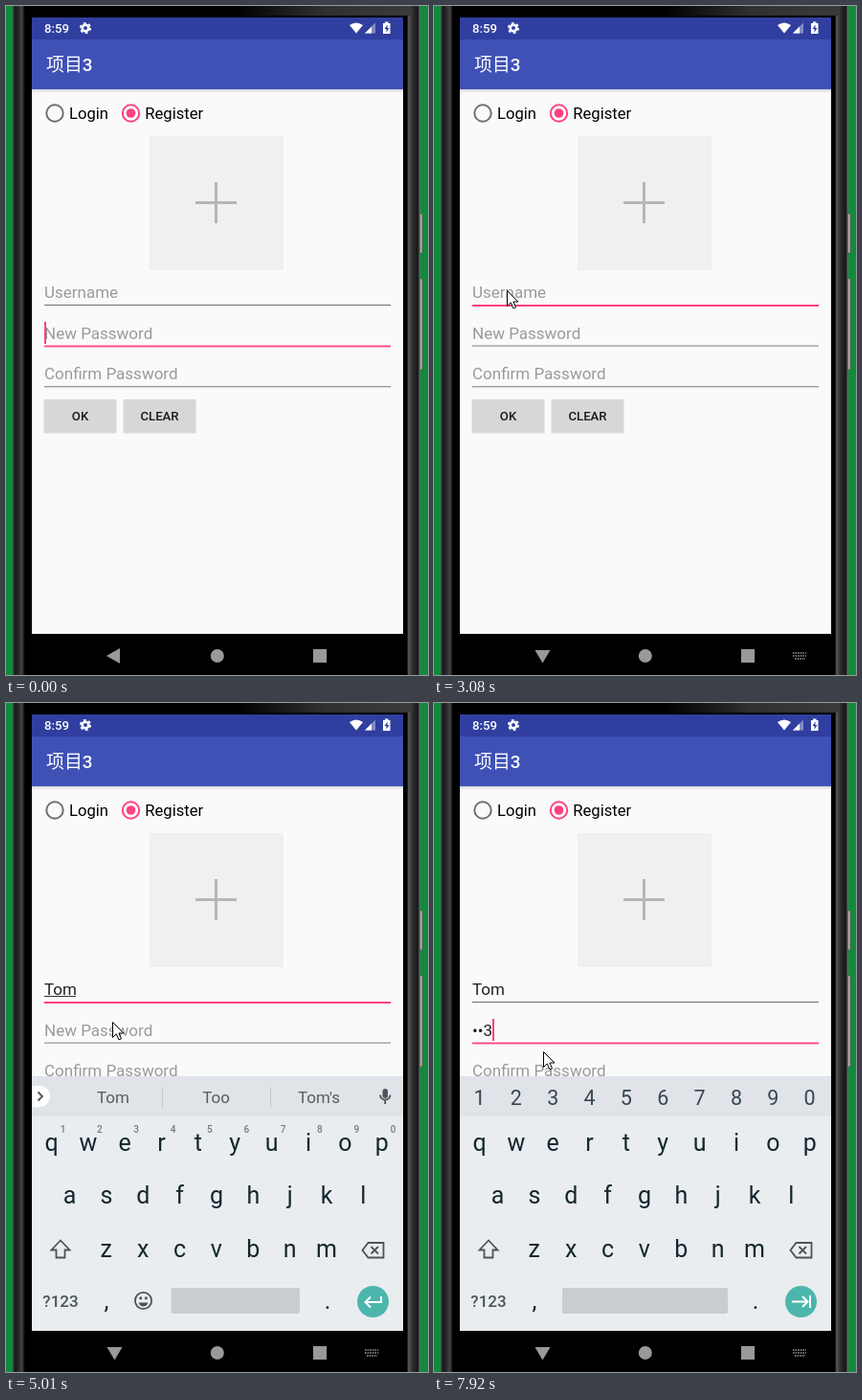
An HTML page that plays this animation: 441x699 px, repeating every 8000 ms.

```html
<!DOCTYPE html>
<html lang="en">
<head>
<meta charset="utf-8">
<title>Register form</title>
<style>
  html, body { margin: 0; width: 100%; height: 100%; overflow: hidden; background: #128a3d; }
  svg { display: block; width: 441px; height: 699px; font: 17px Roboto, "Noto Sans CJK SC", "Noto Sans CJK", sans-serif; }
  .mid { text-anchor: middle; }
  .bold { font-weight: 500; }
  .hint { fill: #9a9a9a; }
  .key { font-size: 25px; fill: #14272e; }
  .digit { font-size: 21.5px; fill: #37474f; }
  .corner { font-size: 10px; font-weight: 500; fill: #747b80; }
  .icon { fill: none; stroke: #4a555b; stroke-width: 1.8; }
</style>
</head>
<body>
<svg viewBox="0 0 441 699">
  <defs>
    <linearGradient id="leftEdge">
      <stop offset="0" stop-color="#4a4a4a"/><stop offset=".12" stop-color="#1a1a1a"/>
      <stop offset=".25" stop-color="#222"/><stop offset=".48" stop-color="#444"/>
      <stop offset=".6" stop-color="#111"/><stop offset=".66" stop-color="#000"/>
    </linearGradient>
    <linearGradient id="rightEdge">
      <stop offset="0" stop-color="#000"/><stop offset=".22" stop-color="#000"/>
      <stop offset=".32" stop-color="#5a5a5a"/><stop offset=".5" stop-color="#333"/>
      <stop offset=".85" stop-color="#161616"/><stop offset="1" stop-color="#777"/>
    </linearGradient>
    <linearGradient id="topEdge">
      <stop offset="0" stop-color="#000"/><stop offset=".5" stop-color="#303030"/>
      <stop offset="1" stop-color="#3a3a3a"/>
    </linearGradient>
    <linearGradient id="barShadow" x2="0" y2="1">
      <stop offset="0" stop-color="#d3d4dd"/><stop offset="1" stop-color="#fafafa"/>
    </linearGradient>
    <clipPath id="screen"><path d="M27 12h388v687H27z"/></clipPath>
  </defs>

  <!-- phone -->
  <path fill="#128a3d" d="M0 0h441v699H0z"/>
  <path fill="#000" d="M8 0h425v699H8z"/>
  <path fill="url(#leftEdge)" d="M7 0h20v699H7z"/>
  <path fill="url(#rightEdge)" d="M415 0h18v699h-18z"/>
  <path fill="url(#topEdge)" d="M240 0h184v10H240z"/>
  <path fill="#bba7b0" stroke="#5f4d55" stroke-width=".6" d="M432.500 217h2.500v41h-2.500zM432.500 285h2.500v95h-2.500z"/>

  <!-- app bars -->
  <path fill="#fafafa" d="M27 12h388v644H27z"/>
  <path fill="#303f9f" d="M27 12h388v23H27z"/>
  <path fill="#3f51b5" d="M27 35h388v52H27z"/>
  <path fill="url(#barShadow)" d="M27 87h388v4H27z"/>
  <g fill="#fff">
    <text class="bold" x="40" y="28" font-size="13.2">8:59</text>
    <text x="42" y="68" font-size="18.9">项目<tspan class="bold">3</tspan></text>
    <circle cx="83" cy="23" r="3.300" fill="none" stroke="#fff" stroke-width="2.600"/>
    <circle cx="83" cy="23" r="5.200" fill="none" stroke="#fff" stroke-width="1.800" stroke-dasharray="2.72"/>
    <path d="M359 20q7-5 14 0l-7 8.500z"/>
    <path opacity=".4" d="M375 28.500l11-11v11z"/><path d="M375 28.500l7-7v7z"/>
    <path d="M394 18h2v-1.500h3.500V18h2v11H394z"/>
    <path fill="#303f9f" d="M398.500 19.500l-3 4.500h2v3.500l3-4.500h-2z"/>
  </g>

  <!-- form -->
  <g fill="none" stroke-width="2">
    <circle cx="51" cy="112" r="8.700" stroke="#707070"/>
    <circle cx="130.500" cy="112" r="8.700" stroke="#ff4081"/>
  </g>
  <circle cx="130.500" cy="112" r="4.800" fill="#ff4081"/>
  <g font-size="16.6"><text x="66" y="118">Login</text><text x="145.300" y="118">Register</text></g>
  <path fill="#f0f0f0" d="M150 136h140v140H150z"/>
  <path fill="none" stroke="#b6b6b6" stroke-width="3" d="M198 205.500h43M219.500 184v43"/>
  <text class="hint" id="userHint" x="40" y="305">Username</text>
  <text class="hint" id="passHint" x="40" y="348">New Password</text>
  <text class="hint" x="40" y="390">Confirm Password</text>
  <text id="user" x="40" y="305" fill="#212121"></text>
  <text id="pass" x="40" y="348" fill="#212121"></text>
  <rect id="composing" x="40" y="306" height="1" fill="#333"/>
  <rect id="userLine" x="40" width="362"/>
  <rect id="passLine" x="40" width="362"/>
  <rect x="40" y="397.300" width="362" height="1" fill="#777"/>
  <rect id="caret" width="2" height="23" fill="#ff4081"/>
  <path fill="#000" opacity=".13" d="M39.500 412h76v34.500h-76zM122.500 412h76v34.500h-76z"/>
  <path fill="#d6d7d7" d="M40 411h75v34H40zM123 411h75v34h-75z"/>
  <g class="mid bold" font-size="13.2" fill="#1c1c1c">
    <text x="77.500" y="433">OK</text><text x="160.500" y="433">CLEAR</text>
  </g>

  <!-- keyboard -->
  <g clip-path="url(#screen)"><g id="keyboard" class="mid">
    <path fill="#000" d="M27 656h388v43H27z"/>
    <path fill="#e9edf0" d="M27 390h388v266H27z"/>
    <path fill="#e0e4e8" d="M27 390h388v42H27z"/>
    <g id="letters"></g>
    <g id="textMode">
      <path fill="#fff" d="M27 400h8a11 11 0 0 1 0 22h-8z"/>
      <path class="icon" stroke-width="2" d="M33.500 406.500l4.500 4.500-4.500 4.500"/>
      <path stroke="#c6cacd" d="M163.500 401v22M276.500 401v22"/>
      <g id="suggestions" fill="#555d62"></g>
      <rect x="393.500" y="403" width="5.500" height="10" rx="2.750" fill="#4a555b"/>
      <path class="icon" stroke-width="1.500" d="M391 409.500a5.200 5.200 0 0 0 10.500 0M396.200 415v4"/>
      <g id="corners"></g>
      <circle class="icon" cx="143.500" cy="624.500" r="8.600"/>
      <path fill="#4a555b" d="M138.500 626.500h10q-1.500 4-5 4t-5-4zM139.500 620.500h2.600v2.800h-2.600zM145 620.500h2.600v2.800H145z"/>
    </g>
    <g id="digits"></g>
    <path class="icon" d="M57 561.500l-9.500 10h5v8h9v-8h5z"/>
    <path class="icon" d="M378.500 564h16v15.500h-16l-6-7.700zM381.500 568l7.500 7.500M389 568l-7.500 7.500"/>
    <text class="bold" x="57" y="631" fill="#4a555b" font-size="17">?123</text>
    <text class="key" x="105" y="633" font-size="22">,</text>
    <text class="key" x="336" y="633" font-size="22">.</text>
    <rect id="space" y="611" height="27" rx="2" fill="#c9cdd0"/>
    <circle cx="383.500" cy="625.500" r="16.500" fill="#4db6ac"/>
    <path id="enter" fill="none" stroke="#fff" stroke-width="2"/>
  </g></g>

  <!-- navigation bar -->
  <g fill="#999">
    <path id="back"/>
    <circle cx="220.800" cy="679" r="7"/>
    <path d="M321 672h14v14h-14z"/>
    <path id="imeSwitch" fill="none" stroke="#999" stroke-width="1.600" stroke-dasharray="1.6 1"
      d="M375 676h14M375 679h14M377 682h11"/>
  </g>

  <path id="pointer" fill="#fff" stroke="#000" d="M.5.5v16l3.800-3.600 2.600 6 2.600-1.100-2.600-5.800h5z"/>
</svg>

<script>
const LOOP = 8000;
const PINK = "#ff4081";
const el = Object.fromEntries([...document.querySelectorAll("[id]")].map(node => [node.id, node]));
const show = (node, on) => node.setAttribute("visibility", on ? "visible" : "hidden");
const set = (node, attrs) => { for (const name in attrs) node.setAttribute(name, attrs[name]); };
const label = (text, x, y, cls = "") => `<text class="${cls}" x="${x}" y="${y}">${text}</text>`;
const row = (chars, x, y, cls) => [...chars].map((c, i) => label(c, x + i * 38.35, y, cls)).join("");

el.letters.innerHTML = row("qwertyuiop", 47.5, 468, "key") + row("asdfghjkl", 66.6, 523, "key") + row("zxcvbnm", 104.8, 579, "key");
el.corners.innerHTML = row("1234567890", 59.5, 449, "corner");
el.digits.innerHTML = row("1234567890", 47.5, 420, "digit");

// Each step is [start time, value]; the last one reached applies.
const stepAt = (steps, t) => steps.filter(([start]) => t >= start).pop()[1];
const userSteps = [[0, ""], [3860, "T"], [4140, "To"], [4200, "Tom"]];
const passSteps = [[0, ""], [7310, "1"], [7510, "•2"], [7720, "••3"]];
const suggestionSteps = [[0, "thanks I we"], [3980, "T I The"], [4250, "Tom Too Tom's"]];
const focusSteps = [[0, "pass"], [2800, "user"], [6600, "pass"]];

// Pointer path: time, x, y
const path = [
  [60, 349, 673], [300, 325, 608], [550, 297, 520], [800, 257, 444], [1050, 215, 404],
  [1300, 171, 385], [1700, 111, 345], [2300, 84, 308], [2600, 76, 297], [4450, 76, 297],
  [5010, 111, 333], [5210, 101, 345], [6150, 101, 345], [6910, 112, 361], [7310, 114, 364]
];

function pointerAt(t) {
  const next = path.findIndex(point => point[0] > t);
  if (next < 0) return path[path.length - 1].slice(1);
  const [t0, x0, y0] = path[Math.max(0, next - 1)], [t1, x1, y1] = path[next];
  const k = t1 > t0 ? (t - t0) / (t1 - t0) : 0;
  return [x0 + (x1 - x0) * k, y0 + (y1 - y0) * k].map(Math.round);
}

function caretOn(t) {
  if (t < 2800) return t < 300 || (t >= 760 && t < 1260);
  if (t < 3860) return t < 3080;
  if (t < 4140 || t >= 6600) return true;
  return (t - 4140) % 1000 < 500;
}

function drawForm(t) {
  const user = stepAt(userSteps, t), pass = stepAt(passSteps, t);
  const onUser = stepAt(focusSteps, t) === "user";
  el.user.textContent = user;
  el.pass.textContent = pass;
  show(el.userHint, !user);
  show(el.passHint, !pass);
  const width = field => field.textContent ? field.getComputedTextLength() : 0;
  set(el.composing, { width: t < 7010 ? Math.max(0, width(el.user) - 1) : 0 });
  set(el.userLine, onUser ? { y: 312, height: 2, fill: PINK } : { y: 312, height: 1, fill: "#707070" });
  set(el.passLine, onUser ? { y: 354.6, height: 1.1, fill: "#8a8a8a" } : { y: 354.6, height: 1.8, fill: PINK });
  const active = onUser ? el.user : el.pass;
  set(el.caret, { x: 40 + Math.round(width(active) - .5), y: onUser ? 288 : 330 });
  show(el.caret, caretOn(t));
}

function drawKeyboard(t) {
  const progress = Math.min(1, Math.max(0, (t - 3220) / 490));
  const rest = (1 - progress) ** 3;
  set(el.keyboard, { transform: `translate(0 ${Math.round(27 * rest)})`, opacity: 1 - rest });
  const numeric = t >= 7060;
  el.textMode.style.display = numeric ? "none" : "";
  el.digits.style.display = numeric ? "" : "none";
  el.suggestions.innerHTML = stepAt(suggestionSteps, t).split(" ")
    .map((word, i) => label(word, 112 + i * 107.5, 418)).join("");
  set(el.space, numeric ? { x: 134, width: 173 } : { x: 172.5, width: 134.5 });
  set(el.enter, { d: numeric ? "M374 625.500h16M385 620l5.500 5.500-5.500 5.500M393 619v13" : "M392 620v6h-16M381 620.500l-5.500 5.500 5.500 5.500" });
}

function draw(t) {
  drawForm(t);
  drawKeyboard(t);
  const imeOpen = t >= 3000;
  set(el.back, { d: imeOpen ? "M105.500 673h16l-8 13.500z" : "M105 679l14-8v16z" });
  show(el.imeSwitch, imeOpen);
  show(el.pointer, t >= 60);
  set(el.pointer, { transform: `translate(${pointerAt(t)})` });
}

function frame() {
  draw(performance.now() % LOOP);
  requestAnimationFrame(frame);
}
frame();
</script>
</body>
</html>
```
